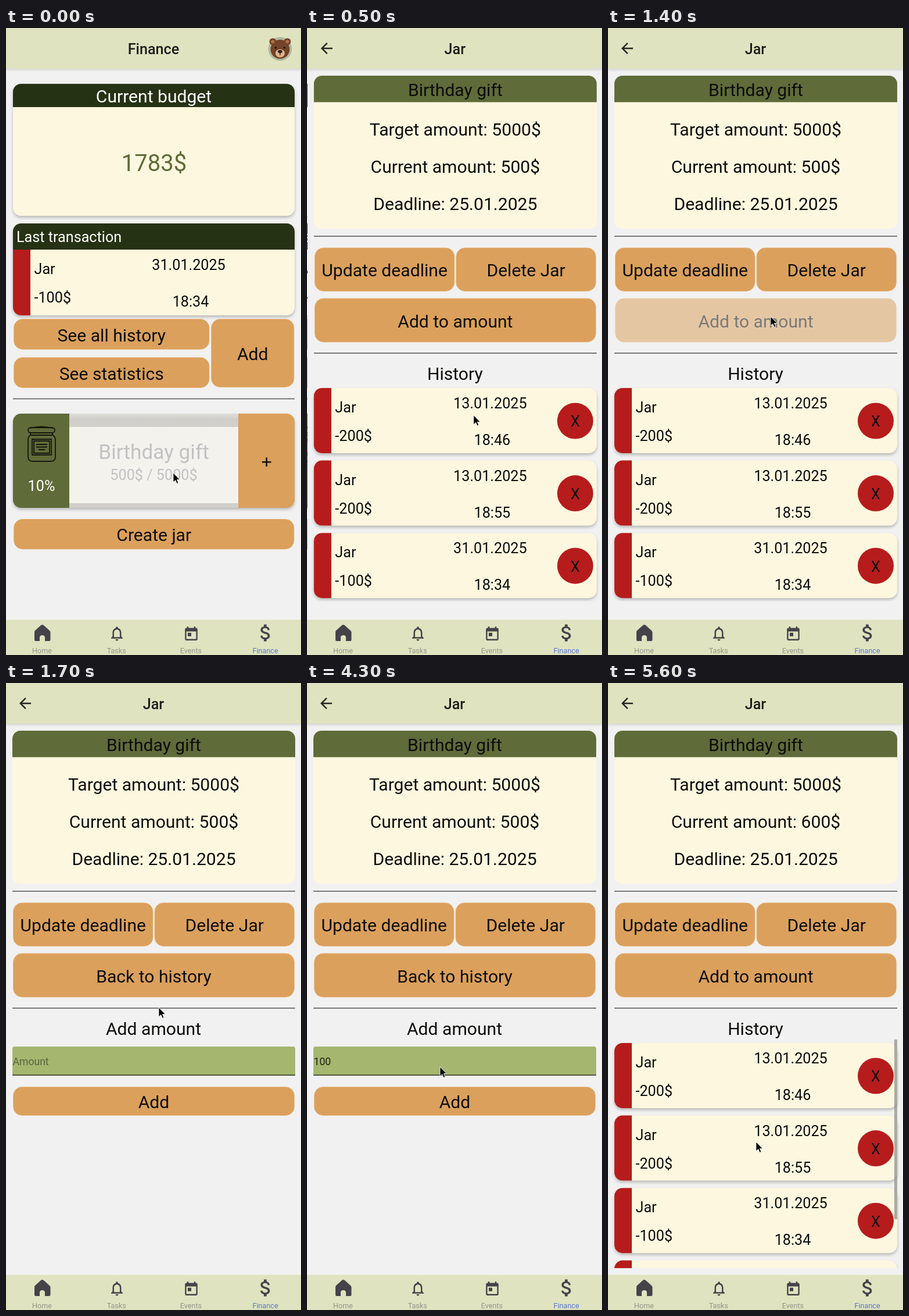
Animation, 508 px wide and 1078 px high, one loop 6100 ms. Source, as an HTML page:

```html
<!DOCTYPE html>
<html lang="en">
<head>
<meta charset="utf-8">
<title>Savings jar</title>
<style>
  html, body { margin: 0; width: 100%; height: 100%; overflow: hidden; background: #f1f1f1; }
  svg { display: block; width: 100vw; height: 100vh; }
  text { font-family: Roboto, sans-serif; white-space: pre; }
  .card { filter: drop-shadow(0 3px 2.5px rgba(0, 0, 0, .24)); }
</style>
</head>
<body>
<svg id="stage" viewBox="0 0 508 1078" preserveAspectRatio="none"></svg>
<script>
const CREAM = '#fef7df', ORANGE = '#dba05c', OLIVE = '#5f6b38', DARK = '#263214',
      RED = '#b71c1c', BAR = '#dfe3bf', PAGE = '#f1f1f1', ICON = '#45424a';
const SMALL = 25.2, MEDIUM = 30.1, LARGE = 35.2, HUGE = 40;
const LOOP = 6100, STEP = 100;

// ---- drawing helpers: each returns SVG markup; text is placed by the middle of its capitals
const rect = (x, y, w, h, fill, extra = '') =>
  `<rect x="${x}" y="${y}" width="${w}" height="${h}" fill="${fill}" ${extra}/>`;

const text = (s, x, y, size, { fill = '#0c0c0a', anchor = 'middle', weight = 400, id = '' } = {}) =>
  `<text ${id && `id="${id}"`} x="${x}" y="${y + size * .355}" font-size="${size}" fill="${fill}"
    text-anchor="${anchor}" font-weight="${weight}">${s}</text>`;

const left = (s, x, y, size, options) => text(s, x, y, size, { anchor: 'start', ...options });

const group = (id, content, extra = '') => `<g id="${id}" ${extra}>${content}</g>`;

const icon = (d, x, y, scale, fill = ICON) =>
  `<path d="${d}" fill="${fill}" transform="translate(${x} ${y}) scale(${scale})"/>`;

// Rectangle with separate corner radii: top left, top right, bottom right, bottom left
function box(x, y, w, h, fill, [a, b, c, d]) {
  return `<path fill="${fill}" d="M${x + a} ${y}h${w - a - b}a${b} ${b} 0 0 1 ${b} ${b}v${h - b - c}
    a${c} ${c} 0 0 1 ${-c} ${c}h${c + d - w}a${d} ${d} 0 0 1 ${-d} ${-d}v${a + d - h}a${a} ${a} 0 0 1 ${a} ${-a}z"/>`;
}

const button = (label, x, y, w, h, id) =>
  rect(x, y, w, h, ORANGE, 'rx="15" stroke="#e6b67c" stroke-width=".8"') +
  text(label, x + w / 2, y + h / 2 + 1.5, MEDIUM, { id });

const rule = (x, y, w) => rect(x, y - .8, w, 1.6, '#5c5c5c');

const header = title =>
  rect(0, 0, 508, 70, BAR, 'style="filter:drop-shadow(0 2px 2px rgba(0,0,0,.13))"') +
  text(title, 254, 36, SMALL, { weight: 500, fill: '#1d1e1a' });

function entry(x, y, w, h, amount, date, time, top = 0) {
  const textX = x + 36.5;
  return box(x, y, 30, h, RED, [top ? 0 : 14, 0, 0, 14]) +
    left('Jar', textX, y + 33, SMALL) + left(amount, textX, y + 82, SMALL) +
    text(date, 314.5, y + 26, SMALL) + text(time, 318, y + 89, SMALL);
}

// ---- finance screen
const bear = `
  <circle cx="472" cy="36" r="19.5" fill="#b9bda4" stroke="#8fa39a"/>
  <g fill="#744327"><circle cx="459.5" cy="23.5" r="6"/><circle cx="484.5" cy="23.5" r="6"/>
  <ellipse cx="472" cy="36.5" rx="16.5" ry="16.5"/></g>
  <circle cx="459.5" cy="23.5" r="3" fill="#a86f49"/><circle cx="484.5" cy="23.5" r="3" fill="#a86f49"/>
  <ellipse cx="472" cy="43.5" rx="8" ry="7" fill="#dfb58c"/>
  <ellipse cx="472" cy="40.5" rx="4" ry="2.8" fill="#2c1a14"/>
  <path d="M472 42v5" stroke="#2c1a14" stroke-width="1.3"/>
  <circle cx="464.5" cy="34" r="1.8" fill="#20140f"/><circle cx="479.5" cy="34" r="1.8" fill="#20140f"/>`;

const jarIcon = `<g fill="none" stroke="#15170e" stroke-width="1.8" stroke-linejoin="round">
  <rect x="38" y="687" width="46" height="9" rx="4.5"/><path d="M42 688q19-5 38 0M42 696v4M80 696v4"/>
  <path d="M42 700q-4 3-4 8v29q0 8 8 8h31q8 0 8-8v-29q0-5-4-8z"/>
  <rect x="45" y="707" width="33" height="27"/><rect x="48" y="710" width="27" height="21"/>
  <path d="M52 716h19M52 720.5h19M56 725h11"/></g>`;

const finance = rect(0, 0, 508, 1018, PAGE) + header('Finance') + bear +
  `<g class="card">${box(12, 96, 485, 227, CREAM, [14, 14, 14, 14])}</g>` +
  box(12, 96, 485, 40, DARK, [14, 14, 0, 0]) +
  text('Current budget', 254.5, 117.5, MEDIUM, { fill: '#fff' }) +
  text('1783$', 255, 231.5, HUGE, { fill: OLIVE }) +
  `<g class="card">${box(12, 336, 485, 158, CREAM, [14, 14, 14, 14])}</g>` +
  box(12, 336, 485, 45, DARK, [14, 14, 0, 0]) +
  left('Last transaction', 18, 359.5, SMALL, { fill: '#fff' }) +
  entry(12, 381, 485, 113, '-100$', '31.01.2025', '18:34', 1) +
  button('See all history', 13.5, 500.5, 336.5, 52) +
  button('See statistics', 13.5, 566.5, 336.5, 52) +
  button('Add', 353.5, 500.5, 142.5, 117) +
  rule(12, 637.5, 485) +
  `<g class="card">${box(12, 663, 485, 162, PAGE, [14, 14, 14, 14])}</g>` +
  rect(109, 663, 291, 23, 'url(#band)') + rect(109, 817, 291, 8, '#c6c6c6') +
  group('jarMiddle', rect(109, 663, 291, 162, CREAM) +
    text('Birthday gift', 254.5, 729, LARGE) + text('500$ / 5000$', 254.5, 768.5, SMALL)) +
  box(12, 663, 97, 162, OLIVE, [14, 0, 0, 14]) + jarIcon +
  text('10%', 61, 787, SMALL, { fill: '#fff' }) +
  box(400, 663, 97, 162, ORANGE, [0, 14, 14, 0]) +
  '<path d="M441 746.3h15.5M448.7 738.5v15.5" stroke="#111" stroke-width="2.6"/>' +
  button('Create jar', 13.5, 844.5, 482.5, 51.5);

// ---- jar screen
const records = [['-200$', '13.01.2025', '18:46'], ['-200$', '13.01.2025', '18:55'],
                 ['-100$', '31.01.2025', '18:34'], ['-100$', '31.01.2025', '18:36']];

const record = (data, i) => group('record' + i,
  `<g class="card">${box(11, 0, 487, 112, CREAM, [14, 14, 14, 14])}</g>` +
  entry(11, 0, 487, 112, ...data) +
  '<circle cx="461" cy="56.5" r="31" fill="' + RED + '"/>' + text('X', 461, 57.5, SMALL),
  `transform="translate(0 ${619 + i * 124.6})"`);

const history = text('History', 254, 594.5, MEDIUM) +
  `<g clip-path="url(#list)">${records.map(record).join('')}</g>` +
  group('scrollbar', rect(493, 613, 5, 309, '#8d8d87', 'opacity=".72"'));

const addForm = text('Add amount', 254, 594.5, MEDIUM) +
  box(11, 625, 487, 49, '#a5b66f', [4, 4, 0, 0]) + rect(11, 673.5, 487, 1.5, '#30332a') +
  left('', 11.5, 651, 17.6, { id: 'field' }) +
  group('addButton', button('Add', 12.5, 694.5, 484, 49));

const arrow = 'M20 11H7.83l5.59-5.59L12 4l-8 8 8 8 1.41-1.41L7.83 13H20v-2z';

const jar = rect(0, 0, 508, 1018, PAGE) + header('Jar') + icon(arrow, 18, 20, 1.25, '#24251f') +
  box(11, 82, 487, 263, CREAM, [14, 14, 14, 14]) + box(11, 82, 487, 45.5, OLIVE, [14, 14, 0, 0]) +
  text('Birthday gift', 254.5, 106, MEDIUM) +
  text('Target amount: 5000$', 254.5, 174, MEDIUM) +
  text('', 254.5, 238.5, MEDIUM, { id: 'current' }) +
  text('Deadline: 25.01.2025', 254.5, 302.5, MEDIUM) +
  rule(11, 358, 487) +
  button('Update deadline', 12.5, 378, 240.5, 74.5) + button('Delete Jar', 256, 378, 240.5, 74.5) +
  group('modeButton', button('', 12.5, 465, 484, 75, 'mode')) +
  rule(11, 559, 487) + group('history', history) + group('addForm', addForm);

// ---- bottom navigation
const home = 'M50 1036L60 1027Q62.5 1025 65 1027L75 1036Q76.500 1037.500 76.500 1039V1052Q76.500 1054 74.500 1054H67V1048Q67 1044 62.500 1044Q58 1044 58 1048V1054H51Q49 1054 49 1052V1039Q49 1037 50 1036Z';
const bell = 'M12 22c1.1 0 2-.9 2-2h-4c0 1.100.9 2 2 2zm6-6v-5c0-3.070-1.630-5.640-4.500-6.320V4c0-.83-.67-1.500-1.500-1.500s-1.500.67-1.500 1.500v.68C7.640 5.360 6 7.920 6 11v5l-2 2v1h16v-1l-2-2zm-2 1H8v-6c0-2.480 1.510-4.500 4-4.500s4 2.020 4 4.500v6z';
const calendar = 'M19 3h-1V1h-2v2H8V1H6v2H5c-1.100 0-2 .9-2 2v14c0 1.100.9 2 2 2h14c1.100 0 2-.9 2-2V5c0-1.100-.9-2-2-2zm0 16H5V8h14v11zM7 10h5v5H7z';
const dollar = 'M11.8 10.9c-2.27-.59-3-1.2-3-2.15 0-1.09 1.01-1.85 2.7-1.85 1.78 0 2.44.85 2.5 2.1h2.21c-.07-1.72-1.12-3.3-3.21-3.81V3h-3v2.16c-1.94.42-3.5 1.68-3.5 3.61 0 2.31 1.91 3.46 4.7 4.13 2.5.6 3 1.48 3 2.41 0 .69-.49 1.79-2.7 1.79-2.06 0-2.87-.92-2.98-2.1h-2.2c.12 2.19 1.76 3.42 3.68 3.83V21h3v-2.15c1.95-.37 3.5-1.5 3.5-3.55 0-2.84-2.43-3.81-4.7-4.4z';

const navigation = rect(0, 1017.5, 508, 61, BAR) +
  icon(home, 0, 0, 1) + icon(bell, 176, 1026, 1.25) +
  icon(calendar, 304.6, 1027.8, 1.2) + icon(dollar, 428, 1020.8, 1.6) +
  ['Home', 'Tasks', 'Events', 'Finance'].map((label, i) =>
    text(label, 62 + i * 128.2, 1071, 12.6, { fill: i === 3 ? '#5975d6' : '#93958a' })).join('');

const pointer = '<path d="M0 0V16L3.800 12.500 6.300 18.300 8.800 17.200 6.400 11.600H11.300Z" fill="#000" stroke="#fff" stroke-width=".8"/>';

document.getElementById('stage').innerHTML = `<defs>
  <linearGradient id="band" x2="0" y2="1"><stop stop-color="#d8d8d8"/><stop offset=".45" stop-color="#c4c4c4"/>
  <stop offset="1" stop-color="#c9c9c9"/></linearGradient>
  <clipPath id="list"><rect id="listArea" y="613" width="508" height="393"/></clipPath></defs>` +
  group('finance', finance) + group('jar', jar) + navigation + group('pointer', pointer);

// ---- motion
const $ = Object.fromEntries([...document.querySelectorAll('[id]')].map(el => [el.id, el]));
const clamp = v => Math.min(1, Math.max(0, v));
const smooth = v => v * v * (3 - 2 * v);
const show = (el, visible) => el.setAttribute('display', visible ? 'inline' : 'none');
const move = (el, x, y) => el.setAttribute('transform', `translate(${x} ${y})`);
const cubic = (a, b, c, d, u) =>
  a * (1 - u) ** 3 + 3 * b * u * (1 - u) ** 2 + 3 * c * u * u * (1 - u) + d * u ** 3;

// Quick start with a very long slow end, made of two joined Bézier curves
function slideEase(x) {
  const [xs, ys] = x < 1 / 6
    ? [[0, .05, .1333, 1 / 6], [0, 0, .06, .4]]
    : [[1 / 6, .2083, .25, 1], [.4, .82, 1, 1]];
  let low = 0, high = 1;
  for (let i = 0; i < 24; i++) {
    const mid = (low + high) / 2;
    if (cubic(...xs, mid) < x) low = mid; else high = mid;
  }
  return cubic(...ys, low);
}

// Opacity of a touched control: dims on press, recovers after release
const touch = (t, down, up) =>
  1 - .65 * smooth(clamp((t - down) / 150)) * (1 - smooth(clamp((t - up) / 200)));

const path = [[0, 288, 765], [300, 289, 760], [800, 283, 492], [900, 282, 487], [1400, 280, 496],
  [1700, 263, 558], [2200, 252, 640], [2700, 249, 649], [3000, 230, 659], [4300, 229, 660],
  [4600, 237, 714], [5000, 241, 726], [5600, 255, 789], [LOOP, 255, 789]];

function pointerAt(t) {
  const i = path.findIndex(p => p[0] > t);
  const [t0, x0, y0] = path[i - 1], [t1, x1, y1] = path[i];
  const k = smooth((t - t0) / (t1 - t0));
  return [x0 + (x1 - x0) * k, y0 + (y1 - y0) * k];
}

function render(t) {
  const slide = slideEase(clamp((t - 200) / 450));
  move($.finance, -51 * slide, 0);
  move($.jar, 51 * (1 - slide), 0);
  $.jar.setAttribute('opacity', clamp((t - 250) / 83));
  $.jarMiddle.setAttribute('opacity', .2 + .8 * smooth(clamp((t - 100) / 200)));

  const adding = t >= 1500 && t < 5000, saved = t >= 4900;
  show($.history, !adding);
  show($.addForm, adding);
  show($.record3, saved);
  show($.scrollbar, saved);
  $.listArea.setAttribute('height', saved ? 393 : 373);
  $.current.textContent = `Current amount: ${saved ? 600 : 500}$`;
  $.mode.textContent = adding ? 'Back to history' : 'Add to amount';
  $.modeButton.setAttribute('opacity', touch(t, 1300, 1450));
  $.addButton.setAttribute('opacity', touch(t, 4600, 4750));

  const typed = '100'.slice(0, [3300, 3500, 3700].filter(at => t >= at).length);
  $.field.textContent = typed || 'Amount';
  $.field.setAttribute('fill', typed ? '#1d2114' : '#596440');

  move($.pointer, ...pointerAt(t));
}

function frame() {
  const t = performance.now() % LOOP;
  render(Math.floor(t / STEP) * STEP);
  requestAnimationFrame(frame);
}
frame();
</script>
</body>
</html>
```
